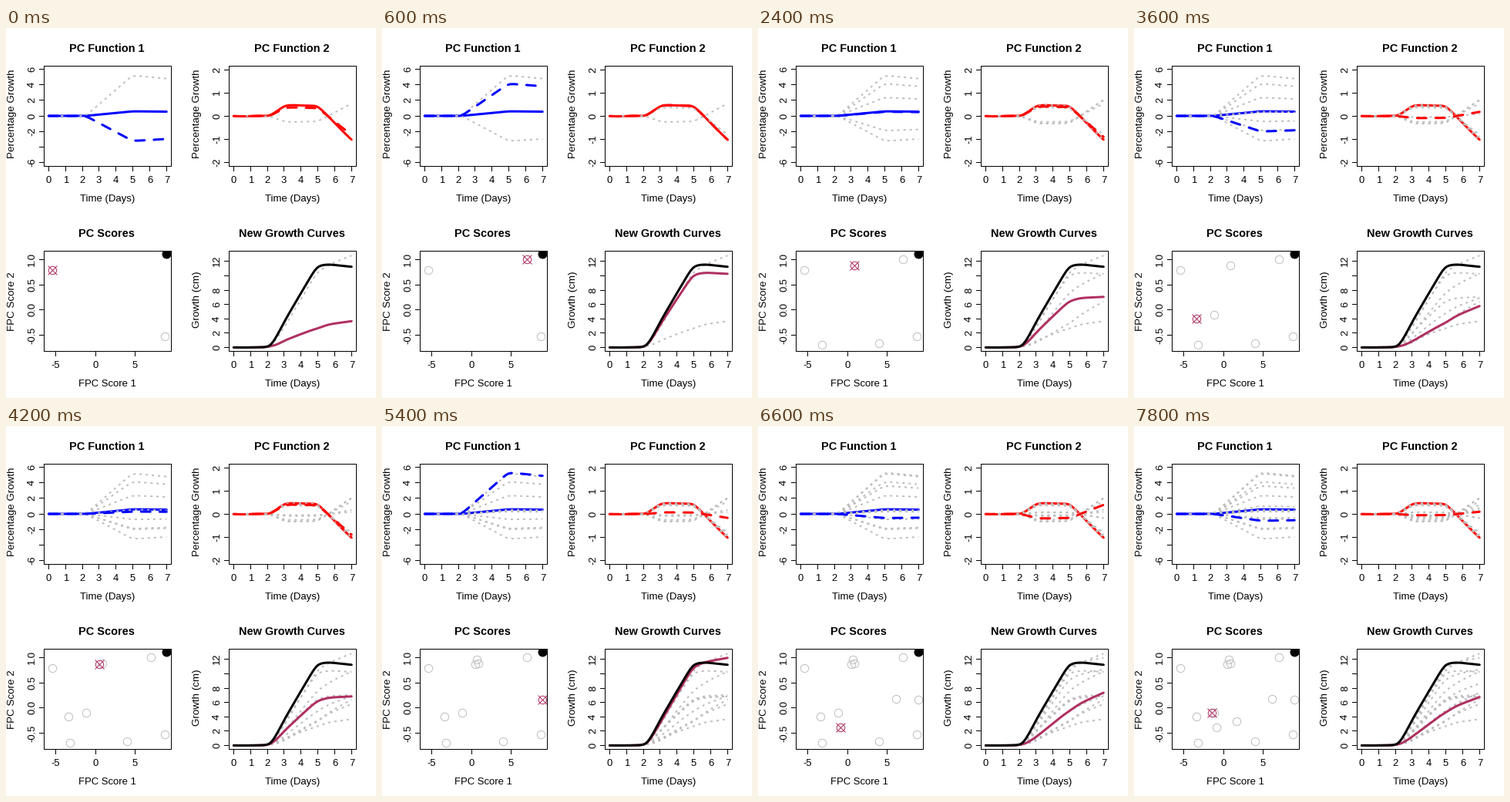
Recreate the animation shown at these times as a matplotlib script. Size 480x480 px, loop 8 s.

```python
import numpy as np
import matplotlib
import matplotlib.pyplot as plt
from matplotlib.animation import FuncAnimation
from matplotlib.patches import Rectangle

SIZE, DPI = 480, 96
PX = 72 / DPI                      # one pixel in points
STEP_FRAMES, INTERVAL, FRAMES = 3, 200, 40
GRAY, MAROON = "#bebebe", "#b03060"
BOX_W, BOX_H = 165, 130

matplotlib.rcParams["font.family"] = "Liberation Sans"
matplotlib.rcParams["lines.scale_dashes"] = False

# Key points (score 1, score 2) in order of appearance; the first is already past
SCORES = [(8.8, -0.53), (-5.45, 0.79), (7.0, 1.0), (-3.2, -0.69), (4.0, -0.67),
          (0.9, 0.88), (-1.2, -0.09), (-3.4, -0.18), (0.5, 0.87), (0.65, 0.96),
          (9.0, 0.16), (6.1, 0.18), (-0.9, -0.39), (1.7, -0.26), (-1.5, -0.10)]
BEST = (9.0, 1.11)

days = np.linspace(0, 7, 141)


def ramp(start, end, soft=.1):
    """Rise with slope 1 from start to end, with rounded corners."""
    bend = lambda a: soft * np.logaddexp(0, (days - a) / soft)
    return bend(start) - bend(end)


pc1 = .215 * ramp(2.2, 4.95) - .024 * ramp(5.2, 9)
pc2 = .5 * ramp(2.12, 3.04) - .72 * ramp(4.95, 9) - .01 * np.sin(np.pi * days)
mean = (2.1 * ramp(2.28, 4.85, .2) + 1.35 * ramp(4.85, 5.6, .2)
        + .75 * ramp(5.6, 9, .2))


def growth(score):
    return mean + score[0] * pc1 + score[1] * pc2


fig = plt.figure(figsize=(SIZE / DPI, SIZE / DPI), dpi=DPI, facecolor="white")
ax = fig.add_axes([0, 0, 1, 1])
ax.set_xlim(0, SIZE)
ax.set_ylim(SIZE, 0)
ax.axis("off")


def rule(xs, ys):
    ax.plot(xs, ys, color="black", lw=PX, snap=False, zorder=10,
            solid_capstyle="projecting")


def label(x, y, text, size=13, angle=0, weight="normal"):
    ax.text(x, y, text, fontsize=size * PX, fontweight=weight, rotation=angle,
            rotation_mode="anchor", ha="center", va="baseline")


class Panel:
    def __init__(self, col, row, title, xlab, ylab, ylab_shift, x_axis, y_axis):
        """Each axis is (pixel of zero, pixels per unit, {tick: text})."""
        left, top = 49.5 + 240 * col, 49.5 + 240 * row
        right, bottom = left + BOX_W, top + BOX_H
        self.x0, self.sx, x_ticks = x_axis
        self.y0, self.sy, y_ticks = y_axis
        rule([left, right, right, left, left], [top, top, bottom, bottom, top])
        self.clip = Rectangle((left, top), BOX_W, BOX_H, transform=ax.transData)

        for value, text in x_ticks.items():
            x = np.floor(self.x(value)) + .5
            rule([x, x], [bottom, bottom + 6])
            label(x, bottom + 21.5, text)
        for value, text in y_ticks.items():
            y = np.floor(self.y(value)) + .5
            rule([left - 6, left], [y, y])
            label(left - 12.5, y, text, angle=90)

        mid = left + BOX_W / 2 - .5
        label(mid - 1, top - 18.5, title, 14.5, weight="bold")
        label(mid, bottom + 45.5, xlab, 13.1)
        label(left - 38.5, top + BOX_H / 2 + ylab_shift, ylab, 13.4, 90)

    def x(self, value):
        return self.x0 + self.sx * np.asarray(value)

    def y(self, value):
        return self.y0 - self.sy * np.asarray(value)

    def draw(self, xs, ys, **style):
        line, = ax.plot(self.x(xs), self.y(ys), **style)
        line.set_clip_path(self.clip)
        return line

    def curve(self, ys, color, z=1):
        return self.draw(days, ys, color=color, lw=3 * PX, zorder=z,
                         solid_capstyle="round")

    def dashed(self, ys, color):
        line = self.curve(ys, color, 3)
        line.set(linestyle=(0, (12 * PX, 12 * PX)), dash_capstyle="round")
        return line

    def dotted(self, ys):
        line = self.curve(ys, GRAY, 2)
        line.set(linestyle=(0, (3 * PX, 5 * PX)), linewidth=2 * PX)
        return line

    def point(self, score, marker, size, color, fill="none", z=2):
        return self.draw([score[0]], [score[1]], ls="none", marker=marker,
                         ms=size * PX, mew=PX, mec=color, mfc=fill, zorder=z)


def ticks(values, fmt="{}", skip=()):
    return {v: "" if v in skip else fmt.format(v) for v in values}


def day_axis(col):
    return 55.33 + 240 * col, 21.85, ticks(range(8))


p1 = Panel(0, 0, "PC Function 1", "Time (Days)", "Percentage Growth", -3.5,
           day_axis(0), (114.02, 10.02, ticks(range(-6, 7, 2), skip=(-4,))))
p2 = Panel(1, 0, "PC Function 2", "Time (Days)", "Percentage Growth", -3.5,
           day_axis(1), (114.3, 30.1, ticks(range(-2, 3))))
p3 = Panel(0, 1, "PC Scores", "FPC Score 1", "FPC Score 2", 0,
           (116, 10.25, ticks((-5, 0, 5))),
           (365.7, 65.3, ticks((-.5, 0, .5, 1), "{:.1f}")))
p4 = Panel(1, 1, "New Growth Curves", "Time (Days)", "Growth (cm)", -2,
           day_axis(1), (414.4, 9.29, ticks(range(0, 13, 2), skip=(10,))))

p1.curve(pc1, "blue")
p2.curve(pc2, "red")
p3.point(BEST, "o", 11, "black", "black", 4)
p4.curve(growth(BEST), "black", 4)

past, current = [], []
for s in SCORES:
    past.append([p1.dotted(s[0] * pc1), p2.dotted(s[1] * pc2),
                 p4.dotted(growth(s)), p3.point(s, "o", 10.4, GRAY)])
    current.append([p1.dashed(s[0] * pc1, "blue"), p2.dashed(s[1] * pc2, "red"),
                    p4.curve(growth(s), MAROON, 3),
                    p3.point(s, "o", 10.4, MAROON, z=3),
                    p3.point(s, "x", 12, MAROON, z=3)])


def update(i):
    now = i // STEP_FRAMES + 1
    for n, (old, new) in enumerate(zip(past, current)):
        for artist in old:
            artist.set_visible(n < now)
        for artist in new:
            artist.set_visible(n == now)
    return []


anim = FuncAnimation(fig, update, frames=FRAMES, interval=INTERVAL,
                     init_func=lambda: update(0), repeat=True, repeat_delay=0)
plt.show()
```
